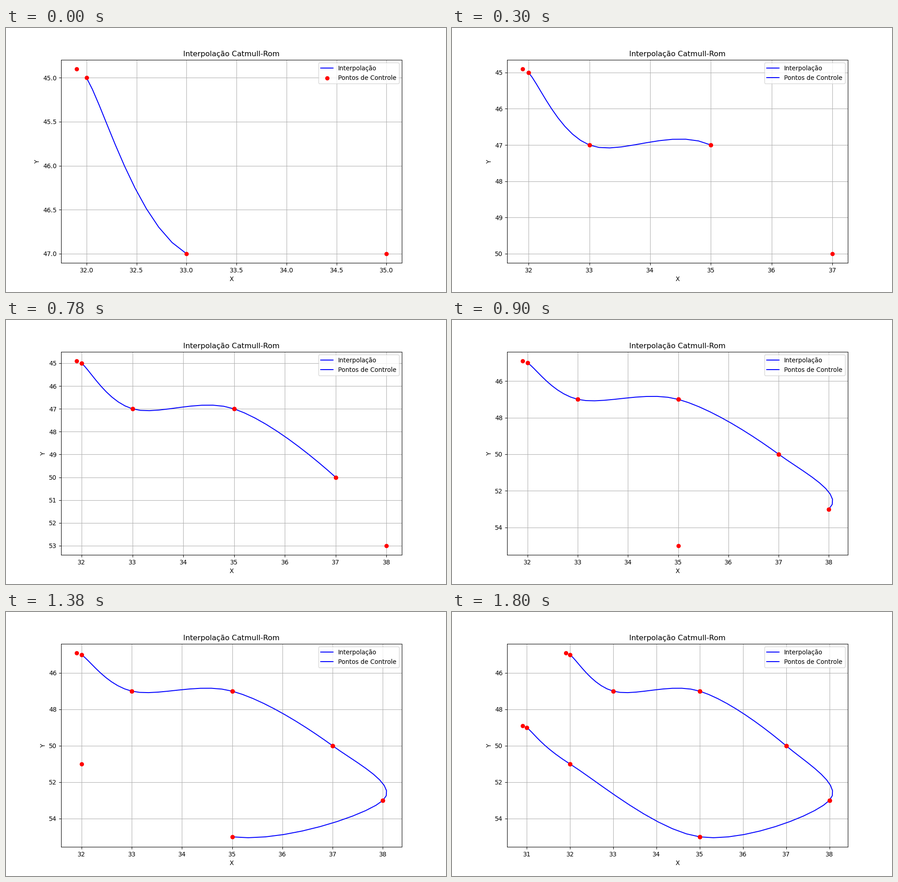
A matplotlib script that plays this animation: 966x580 px, repeating every 2.1 s.

```python
import numpy as np
import matplotlib.pyplot as plt
from matplotlib.animation import FuncAnimation

W, H, DPI = 966, 580, 97
EPS = 0.01  # keeps the pixel size from being truncated

KNOTS = np.array([(32, 45), (33, 47), (35, 47), (37, 50),
                  (38, 53), (35, 55), (32, 51), (31, 49)])
# Each end gets an extra control point just beside it.
POINTS = np.vstack([KNOTS[0] - 0.1, KNOTS, KNOTS[-1] - 0.1])
SEGMENTS = len(KNOTS) - 1
T = np.linspace(0, 1, 11)[:, None]

# Slightly above 10 pt so that hinting rounds the x-height up.
plt.rcParams.update({"font.family": "DejaVu Sans", "font.size": 10.05})
fig, ax = plt.subplots(figsize=((W + EPS) / DPI, (H + EPS) / DPI), dpi=DPI)


def catmull_rom(p0, p1, p2, p3):
    return 0.5 * (2 * p1 + (p2 - p0) * T
                  + (2 * p0 - 5 * p1 + 4 * p2 - p3) * T**2
                  + (3 * p1 - p0 - 3 * p2 + p3) * T**3)


def draw(step):
    ax.clear()
    lines, dots = [], []
    for i in range(step + 1):
        ctrl = POINTS[i:i + 4]
        lines += ax.plot(*catmull_rom(*ctrl).T, color="blue")
        dots.append(ax.scatter(*ctrl.T, color="red", zorder=3))
    ax.invert_yaxis()
    ax.grid(True)
    ax.set_title("Interpolação Catmull-Rom")
    ax.set_xlabel("X")
    ax.set_ylabel("Y")
    # The legend takes the first two artists, lines before dots.
    ax.legend((lines + dots)[:2], ["Interpolação", "Pontos de Controle"],
              loc="upper right")
    return []


anim = FuncAnimation(fig, draw, frames=SEGMENTS, interval=300,
                     repeat=True, repeat_delay=0)
plt.show()
```
